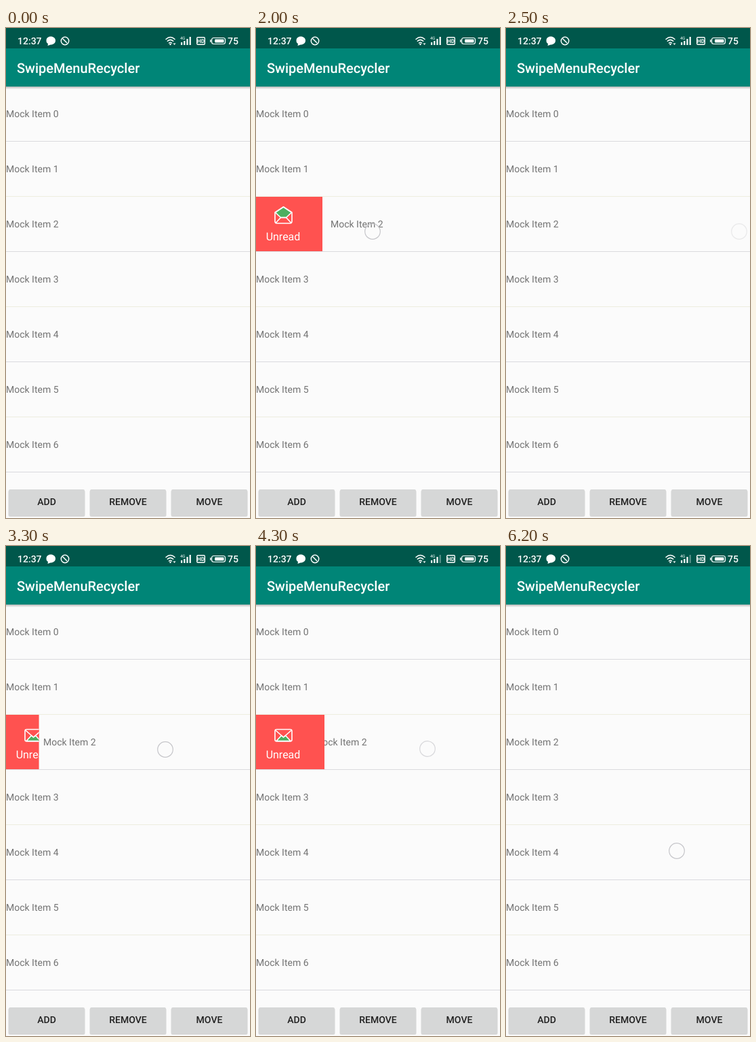
Animation, 360 px wide and 720 px high, one loop 6.3 s. Source, as an HTML page:

```html
<!DOCTYPE html>
<html lang="en">
<head>
<meta charset="utf-8">
<title>Swipe menu list</title>
<style>
  html, body { margin: 0; width: 100%; height: 100%; overflow: hidden; background: #fbfbfb; }
  svg { display: block; width: 100vw; height: 100vh; font-family: Roboto, "Noto Sans", sans-serif; font-size: 14px; text-rendering: geometricPrecision; }
  .medium { font-weight: 500; }
  .row { fill: #737373; }
  .button { font-weight: 500; fill: #212121; text-anchor: middle; }
  .status { fill: #fff; }
  .line { fill: none; stroke: #fff; stroke-width: 1.5; stroke-linecap: round; stroke-linejoin: round; }
  .mail { stroke: #fff; stroke-width: 1.6; stroke-linejoin: round; stroke-linecap: round; }
</style>
</head>
<body>
<svg viewBox="0 0 360 720" preserveAspectRatio="none">
  <defs>
    <linearGradient id="shade" x1="0" y1="0" x2="0" y2="1">
      <stop offset="0" stop-opacity=".28"/>
      <stop offset="1" stop-opacity="0"/>
    </linearGradient>
    <clipPath id="reveal"><rect id="revealBox" y="248" width="0" height="80"/></clipPath>
  </defs>

  <rect width="360" height="720" fill="#fbfbfb"/>
  <g id="rows"></g>

  <g clip-path="url(#reveal)">
    <rect y="248" width="360" height="80" fill="#ff5250"/>
    <g id="openMail" class="mail">
      <path d="M28 271L40.500 263L53 271V284Q53 287 50 287H31Q28 287 28 284Z" fill="#ff5250"/>
      <path d="M28.500 271L40.500 263L52.500 271L44.500 278.500H36.500Z" fill="#4caf60"/>
      <path d="M29 286.500L36.500 278.500H44.500L52 286.500" fill="none"/>
    </g>
    <g id="closedMail" class="mail">
      <rect x="28" y="269.500" width="25" height="17.500" rx="2.500" fill="#ff5250"/>
      <path d="M30 286.500L37.500 278.500L40.500 281L43.500 278.500L51 286.500Z" fill="#4caf60"/>
      <path d="M29 271L40.500 281L52 271" fill="none"/>
    </g>
    <text x="40" y="312" font-size="16" text-anchor="middle" fill="#fff">Unread</text>
  </g>

  <rect width="360" height="30" fill="#00574b"/>
  <rect y="30" width="360" height="56" fill="#008577"/>
  <rect y="86" width="360" height="4" fill="url(#shade)"/>
  <text class="medium" x="16" y="66" font-size="20" fill="#fff">SwipeMenuRecycler</text>

  <g class="status">
    <text class="medium" x="17" y="24">12:37</text>
    <path d="M66 12.500C70 12.500 73 15 73 18.500S70 24.500 66 24.500L61.500 26L62 23C60 22 59.500 20.500 59.500 18.500C59.500 15 62 12.500 66 12.500Z"/>
    <g class="line">
      <circle cx="87" cy="19" r="5.700"/>
      <path d="M84 16L89.500 21.500"/>
      <path d="M236 16.500Q242.500 10.500 249 16.500M238.300 19.300Q242.500 15.500 246.700 19.300M240.500 22Q242.500 20.400 244.500 22"/>
      <rect x="281.700" y="13.700" width="11.600" height="10.600" rx="1.500" stroke-width="1.400"/>
      <rect x="303.500" y="14.500" width="20" height="9" rx="3" stroke-width="1.200"/>
    </g>
    <circle cx="242.500" cy="24" r="1.200"/>
    <path d="M246.500 22.500h4l-2 2.500z"/>
    <text x="257" y="17" font-size="6">4G</text>
    <path d="M258 21h2.200v4h-2.200zM262.200 19h2.200v6h-2.200zM266.400 16h2.200v9h-2.200z"/>
    <rect id="lastBar" x="270.600" y="13" width="2.200" height="12"/>
    <text x="287.500" y="22" font-size="8" font-weight="700" text-anchor="middle">HD</text>
    <rect x="308" y="16.500" width="13.500" height="5" rx="1.200"/>
    <rect x="301" y="17" width="1.500" height="4" rx=".7"/>
    <text class="medium" x="327" y="24">75</text>
  </g>

  <g id="buttons"></g>
  <circle id="touch" r="11.300" fill="none" stroke="#c6c6ca" stroke-width="1.200"/>
</svg>

<script>
const LOOP = 6300, STEP = 100, MENU_LAG = 16;
const byId = id => document.getElementById(id);

// Horizontal offset of the swiped row: [ms, px]
const swipe = [
  [500, 0], [600, 8], [700, 35], [800, 70], [900, 91], [1000, 85], [1100, 80],
  [1960, 80], [2000, 110], [2100, 209], [2200, 259], [2300, 282], [2400, 70], [2470, 0],
  [3100, 0], [3200, 15], [3300, 55], [3400, 82], [3500, 82], [3600, 80],
  [3900, 80], [4000, 94], [4100, 142], [4200, 180], [4300, 86], [4400, 80],
  [5300, 80], [5400, 58], [5500, 20], [5600, 4], [5700, 0]
];

// Finger presses; dx is the finger's distance from the row's edge
const presses = [
  { down: 500, up: 900, dx: 194, y: 299 },
  { down: 2000, up: 2300, dx: 62, y: 299 },
  { down: 3100, up: 3400, dx: 180, y: 299 },
  { down: 3900, up: 4200, dx: 73, y: 298 },
  { down: 5300, up: 5500, dx: 160, y: 299 },
  { down: 6200, up: 6300, dx: 252, y: 448 }
];
const FADE = 300;

function offsetAt(t) {
  const next = swipe.findIndex(key => key[0] > t);
  if (next === 0 || next < 0) return 0;
  const [t0, x0] = swipe[next - 1], [t1, x1] = swipe[next];
  return x0 + (x1 - x0) * (t - t0) / (t1 - t0);
}

byId("rows").innerHTML = Array.from({ length: 7 }, (_, i) => `
  <rect y="${166 + i * 81}" width="360" height="1" fill="${i % 2 ? "#ededdf" : "#dadade"}"/>
  <text class="row" x="0" y="${131 + i * 81}">Mock Item ${i}</text>`).join("");

byId("buttons").innerHTML = ["ADD", "REMOVE", "MOVE"].map((label, i) => `
  <rect x="${3.5 + i * 120}" y="679" width="113" height="39" rx="2.500" opacity=".15"/>
  <rect x="${4 + i * 120}" y="678" width="112" height="38" rx="2" fill="#d6d7d7"/>
  <text class="button" x="${60 + i * 120}" y="701">${label}</text>`).join("");

const swipedRow = document.querySelectorAll(".row")[2];

function draw() {
  const t = Math.floor(performance.now() % LOOP / STEP) * STEP;
  swipedRow.setAttribute("x", offsetAt(t));
  byId("revealBox").setAttribute("width", offsetAt(t - MENU_LAG));

  const read = t >= 2100;
  byId("openMail").style.display = read ? "none" : "";
  byId("closedMail").style.display = read ? "" : "none";
  byId("lastBar").setAttribute("opacity", t < 3400 ? 1 : 0.35);

  const touch = byId("touch");
  const press = presses.find(p => t >= p.down && t < p.up + FADE);
  touch.style.display = press ? "" : "none";
  if (press) {
    touch.setAttribute("cx", press.dx + offsetAt(Math.min(t, press.up)));
    touch.setAttribute("cy", press.y);
    touch.setAttribute("opacity", 1 - Math.max(0, t - press.up) / FADE);
  }
  requestAnimationFrame(draw);
}
draw();
</script>
</body>
</html>
```
